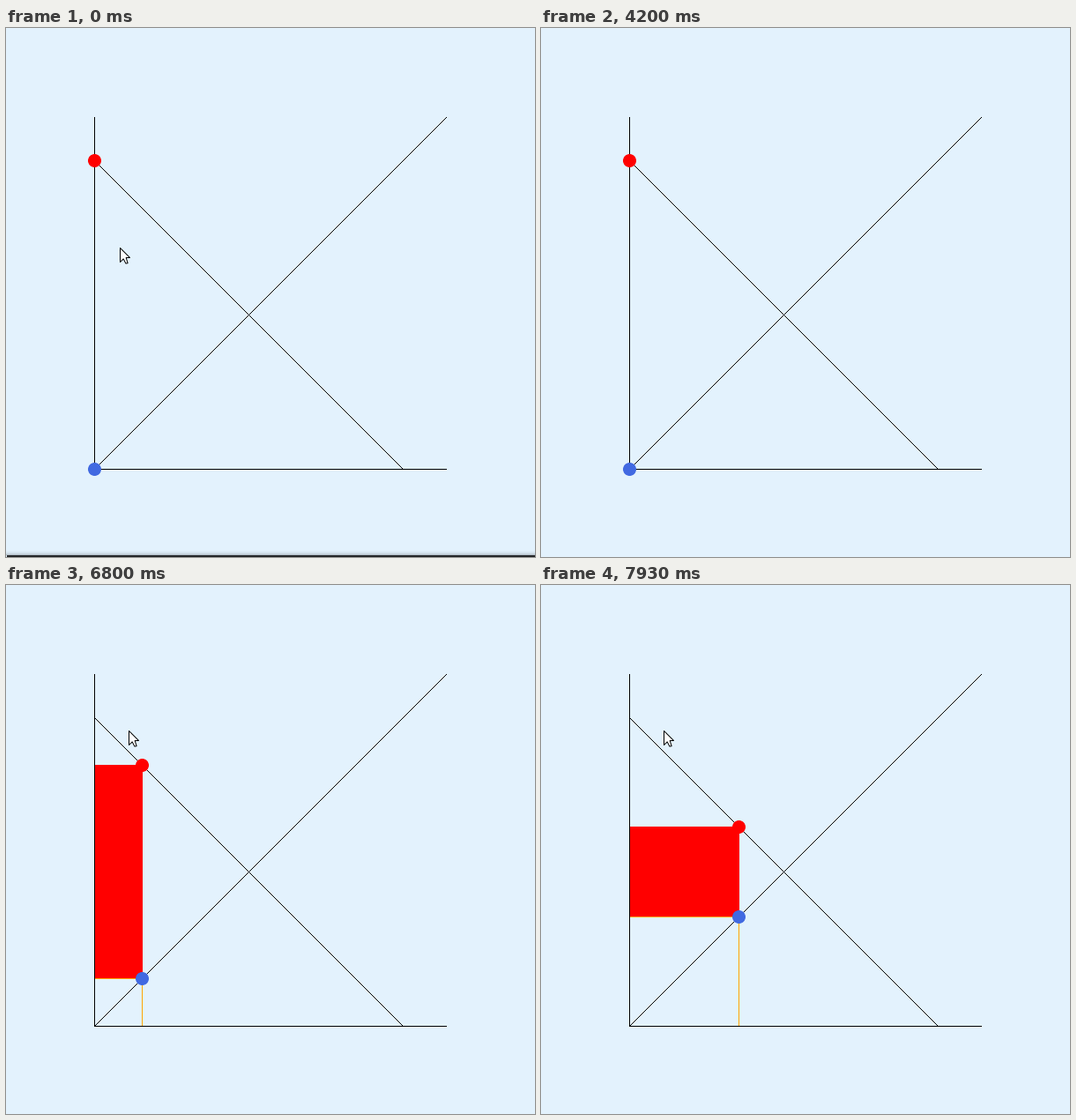
Write a matplotlib script that moves like this. It is 600 px wide and 600 px high and loops after 8000 ms.

```python
import matplotlib.pyplot as plt
import numpy as np
from matplotlib.animation import FuncAnimation
from matplotlib.patches import Circle, Polygon, Rectangle

SIZE, DPI = 600, 100
LOOP_MS, TICK_MS = 8000, 20
RATE = 15  # screen updates per second
PX = 72 / DPI
X0, Y0, TOP = 100, 500, 150

BAR_GONE = 63
LEAVE, GONE, ENTER = 50, 57, 68
PRESS, REPEAT = 82, 90  # key pressed, then auto-repeat sets in

ARROW = np.array([(0, 0), (0, 16), (3.7, 12.4), (6.4, 17.6), (8.6, 17.2),
                  (6.7, 11), (11, 11)]) + .5

fig = plt.figure(figsize=(SIZE / DPI, SIZE / DPI), dpi=DPI,
                 facecolor="#e3f2fd")
ax = fig.add_axes([0, 0, 1, 1])
ax.set_xlim(0, SIZE)
ax.set_ylim(SIZE, 0)
ax.axis("off")


def box(color, z, x=0, y=0, w=0, h=0, alpha=1):
    return ax.add_patch(Rectangle((x, y), w, h, fc=color, lw=0, alpha=alpha,
                                  antialiased=False, zorder=z))


def dot(color):
    return ax.add_patch(Circle((0, 0), 7.5, fc=color, lw=0, zorder=5))


# Both slopes as crisp one-pixel steps
y, x = np.mgrid[:SIZE, :SIZE]
rising = (x + y == X0 + Y0) & (x >= X0) & (x < 500)
falling = (y - x == TOP - X0) & (x >= X0) & (y <= Y0)
slopes = np.zeros((SIZE, SIZE, 4))
slopes[..., 3] = rising | falling
fig.figimage(slopes, origin="upper", zorder=-1)

box("black", 4, X0, 101, 1, 400)
box("black", 4, X0, Y0, 400, 1)

orange_h = box("orange", 2, h=1)
orange_v = box("orange", 2, w=1)
area = box("red", 3)
red_dot, blue_dot = dot("red"), dot("royalblue")
arrow = ax.add_patch(Polygon(ARROW, closed=True, fc="white", ec="black",
                             lw=PX, joinstyle="round", snap=False, zorder=6))

bar = [box("black", 1, 0, 593 + i, SIZE, 1, .02 * 1.8 ** i) for i in range(5)]
bar.append(box("black", 1, 1, 598, SIZE - 1, 2, .84))


def offset(n):
    if n < REPEAT:
        return 2 if n >= PRESS else 0
    return 8 + 4 * (n - REPEAT) - 2 * (100 <= n < 118)


def glide(n, start, steps, a, b, c, power=1):
    """Point on a quadratic curve from a to c, bent towards b, easing out."""
    u = min((n - start) / steps, 1)
    t = 1 - (1 - u) ** power
    a, b, c = map(np.array, (a, b, c))
    return np.round((1 - t) ** 2 * a + 2 * t * (1 - t) * b + t ** 2 * c)


def pointer(n):
    if n < LEAVE:
        return glide(n, 0, 3, (129, 249), (137, 241), (144, 233), 1.5)
    if n < GONE:
        return glide(n, LEAVE, 6, (16, 186), (-8, 110), (30, 1))
    if n >= ENTER:
        return glide(n, ENTER, 5, (119, 40), (168, 160), (139, 165), 1.5)
    return None


def draw(i):
    n = min(round(i * TICK_MS * RATE / 1000), LOOP_MS * RATE // 1000 - 1)
    k = offset(n)
    x, low, high = X0 + k, Y0 - k, TOP + k

    red_dot.center = x + .5, high + .5
    blue_dot.center = x + .5, low + .5
    area.set_bounds(X0, high, k + 1, low - high)
    orange_h.set_bounds(X0, low, k + 1, 1)
    orange_v.set_bounds(x, low, 1, k)
    for part in (area, orange_h, orange_v):
        part.set_visible(k > 0)

    for row in bar:
        row.set_visible(n < BAR_GONE)

    tip = pointer(n)
    arrow.set_visible(tip is not None)
    if tip is not None:
        arrow.set_xy(ARROW + tip)


anim = FuncAnimation(fig, draw, frames=LOOP_MS // TICK_MS, interval=TICK_MS,
                     repeat=True, repeat_delay=0, cache_frame_data=False)
plt.show()
```
